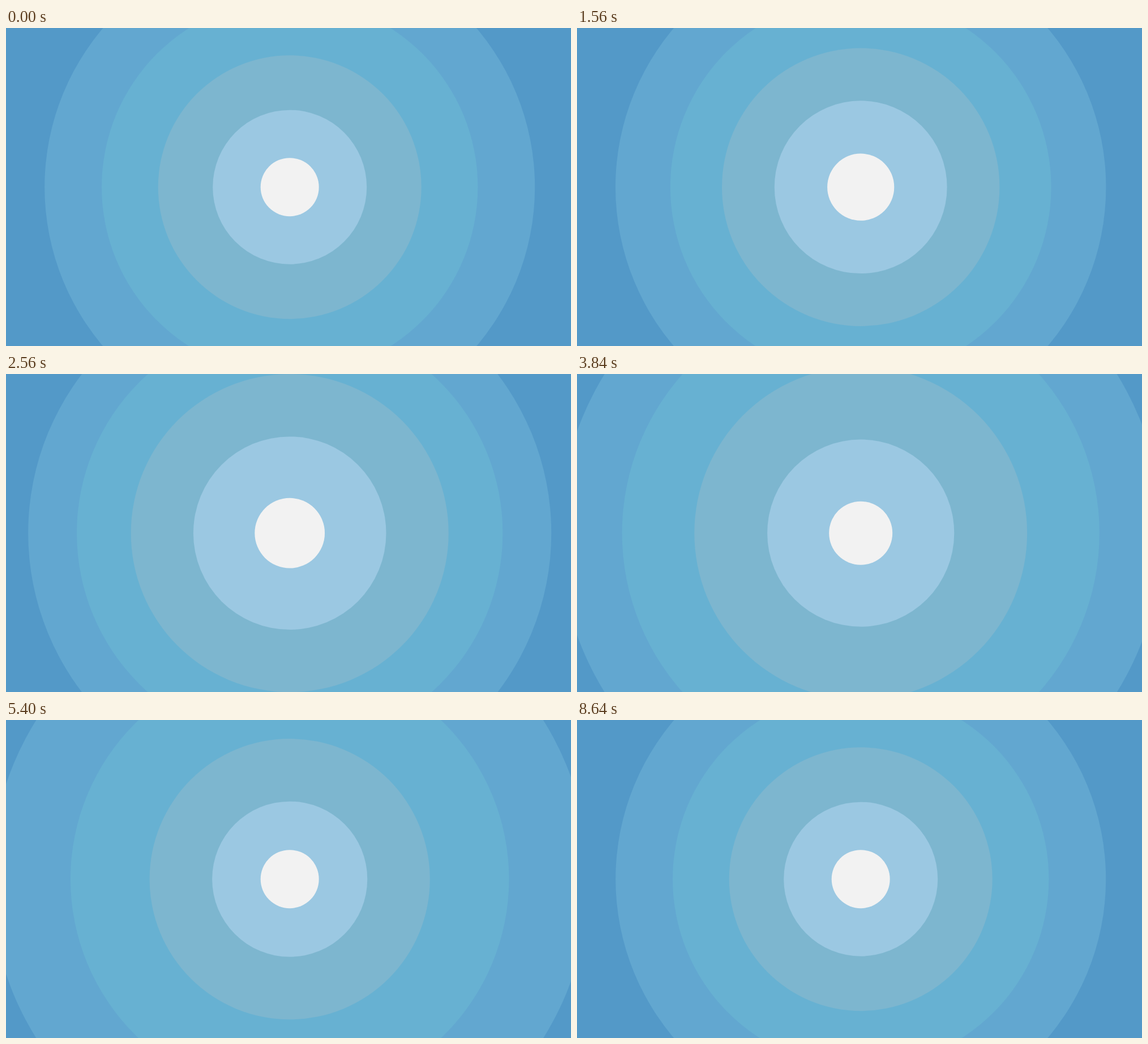
Animation of 998x561 px, one loop 8.68 s. Source, as an HTML page:

```html
<!DOCTYPE html>
<html lang="en">
<head>
<meta charset="utf-8">
<title>Pulsing rings</title>
<style>
  html, body { margin: 0; width: 100%; height: 100%; overflow: hidden; background: #5399c8; }
  svg { display: block; width: 998px; height: 561px; }
</style>
</head>
<body>
<svg id="stage" viewBox="0 0 998 561"></svg>
<script>
const LOOP = 8680, STEP = 40;
const CENTER = { cx: 501.2, cy: 280.7 };

// Outermost first; start, peak and end are in ms.
const rings = [
  { fill: '#62a7d0', base: 433,   grow: 112.5, start: 1461, peak: 4583, end: 7603 },
  { fill: '#67b1d2', base: 332.2, grow: 90.3,  start: 1115, peak: 4050, end: 7150 },
  { fill: '#7db6cf', base: 232.5, grow: 63,    start: 675,  peak: 3520, end: 6365 },
  { fill: '#9bc8e2', base: 136,   grow: 36.2,  start: 267,  peak: 3000, end: 5733 },
  { fill: '#f2f2f2', base: 51.5,  grow: 10.4,  start: 0,    peak: 2440, end: 5040 }
];

// cubic-bezier(.42, 0, .58, 1), solved by bisection
function easeInOut(x) {
  if (x <= 0) return 0;
  if (x >= 1) return 1;
  let lo = 0, hi = 1, u = 0.5;
  for (let i = 0; i < 24; i++) {
    u = (lo + hi) / 2;
    const v = 1 - u;
    const bx = 3 * v * v * u * 0.42 + 3 * v * u * u * 0.58 + u * u * u;
    if (bx < x) lo = u; else hi = u;
  }
  return u * u * (3 - 2 * u);
}

function radius({ base, grow, start, peak, end }, t) {
  const phase = t < peak ? (t - start) / (peak - start) : (end - t) / (end - peak);
  return base + grow * easeInOut(phase);
}

const stage = document.getElementById('stage');
const circles = rings.map(({ fill }) => {
  const circle = document.createElementNS('http://www.w3.org/2000/svg', 'circle');
  for (const [key, value] of Object.entries({ ...CENTER, fill })) circle.setAttribute(key, value);
  return stage.appendChild(circle);
});

function draw(t) {
  circles.forEach((circle, i) => circle.setAttribute('r', radius(rings[i], t).toFixed(2)));
}

const origin = performance.now();
function tick() {
  const t = (performance.now() - origin) % LOOP;
  draw(Math.floor(t / STEP) * STEP);
  requestAnimationFrame(tick);
}
tick();
</script>
</body>
</html>
```
